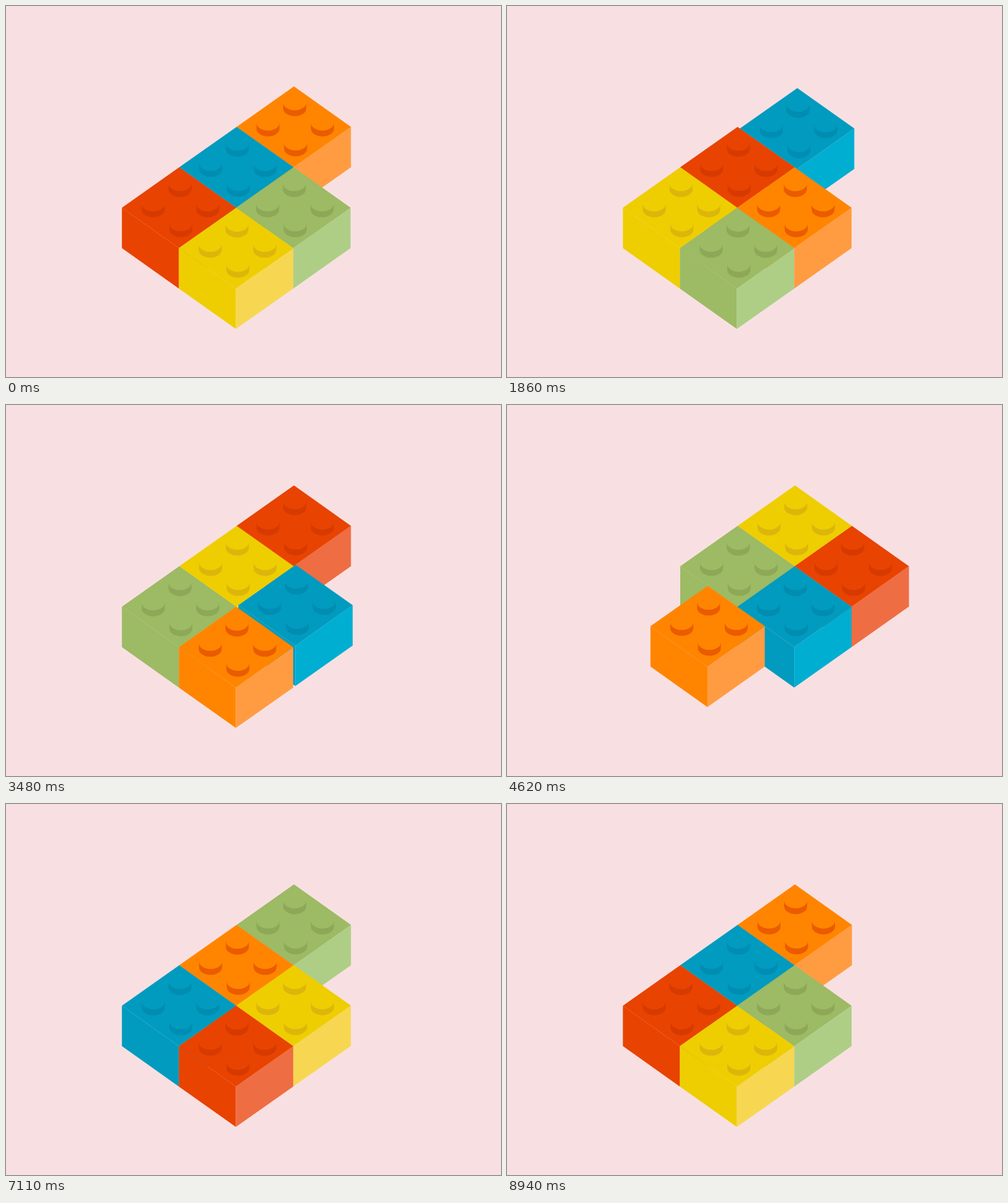
Write an HTML page with a canvas that moves like this. It is 800 by 600 pixels and loops after 8970 ms.

```html
<!DOCTYPE html>
<html lang="en">
<head>
<meta charset="utf-8">
<title>Sliding bricks</title>
<style>
  html, body { margin: 0; width: 100%; height: 100%; overflow: hidden; background: #f8e0e2; }
  canvas { display: block; }
</style>
</head>
<body>
<canvas id="stage" width="800" height="600"></canvas>
<script>
const ctx = document.getElementById('stage').getContext('2d');

const LOOP = 8970, LEAD = 30, MOVE = 300, MOVES = 6;
const LEFT = 92.7, RIGHT = 92.1, DROP = 65.4, WALL = 65.3;
const STUD = { rx: 18.6, ry: 12.4, h: 9.5 };
const STUDS = [[1.2, 26.3], [-42, 59], [46, 59], [2.6, 91.3]];

// Slots form a ring on a 3 x 2 grid: [steps down-left, steps down-right]
const SLOTS = [[0, 0], [1, 0], [2, 0], [2, 1], [1, 1], [0, 1]];

// top and left wall, right wall, stud side
const COLORS = [
  ['#ff8500', '#ff9c42', '#eb5b00'],
  ['#009bbf', '#00aed2', '#008db1'],
  ['#e84300', '#ef6d43', '#d73a00'],
  ['#eece00', '#f7d751', '#ddb60c'],
  ['#9dba64', '#aece86', '#8da857']
];

function ease(p) {
  const u = Math.min(1, Math.max(0, p));
  return u < 0.5 ? 16 * u ** 5 : 1 - 16 * (1 - u) ** 5;
}

// Stage position for a fractional place on the ring
function place(ring) {
  const i = Math.floor(ring), f = ring - i;
  const a = SLOTS[i % 6], b = SLOTS[(i + 1) % 6];
  const l = a[0] + (b[0] - a[0]) * f;
  const r = a[1] + (b[1] - a[1]) * f;
  return { x: 465.4 - l * LEFT + r * RIGHT, y: 130 + (l + r) * DROP };
}

function polygon(color, ...points) {
  ctx.fillStyle = color;
  ctx.beginPath();
  for (const [x, y] of points) ctx.lineTo(x, y);
  ctx.fill();
}

function drawStud(x, y, side, top) {
  const { rx, ry, h } = STUD;
  ctx.fillStyle = side;
  ctx.beginPath();
  ctx.ellipse(x, y + h, rx, ry, 0, 0, Math.PI);
  ctx.lineTo(x - rx, y);
  ctx.ellipse(x, y, rx, ry, 0, Math.PI, 0, true);
  ctx.fill();
}

function drawBrick({ x, y, color: [top, wall, side] }) {
  const l = [x - LEFT, y + DROP], r = [x + RIGHT, y + DROP];
  const front = [x + RIGHT - LEFT, y + 2 * DROP];
  const down = ([px, py]) => [px, py + WALL];
  polygon(top, l, front, down(front), down(l));
  polygon(wall, front, r, down(r), down(front));
  polygon(top, [x, y], r, front, l);
  for (const [dx, dy] of STUDS) drawStud(x + dx, y + dy, side);
}

function draw(now) {
  const step = (now % LOOP + LEAD) / MOVE;
  const round = Math.floor(step / MOVES);
  const p = step % MOVES;

  const bricks = SLOTS.slice(0, 5).map((_, s) => {
    // The first brick of a round hops twice, the others once
    const ring = s ? s - ease(p - s) : 6 - ease(p) - ease(p - 5);
    return { ...place(ring), color: COLORS[(s + round) % 5] };
  });

  ctx.fillStyle = '#f8e0e2';
  ctx.fillRect(0, 0, 800, 600);
  bricks.sort((a, b) => a.y - b.y).forEach(drawBrick);
  requestAnimationFrame(draw);
}

draw(0);
</script>
</body>
</html>
```
